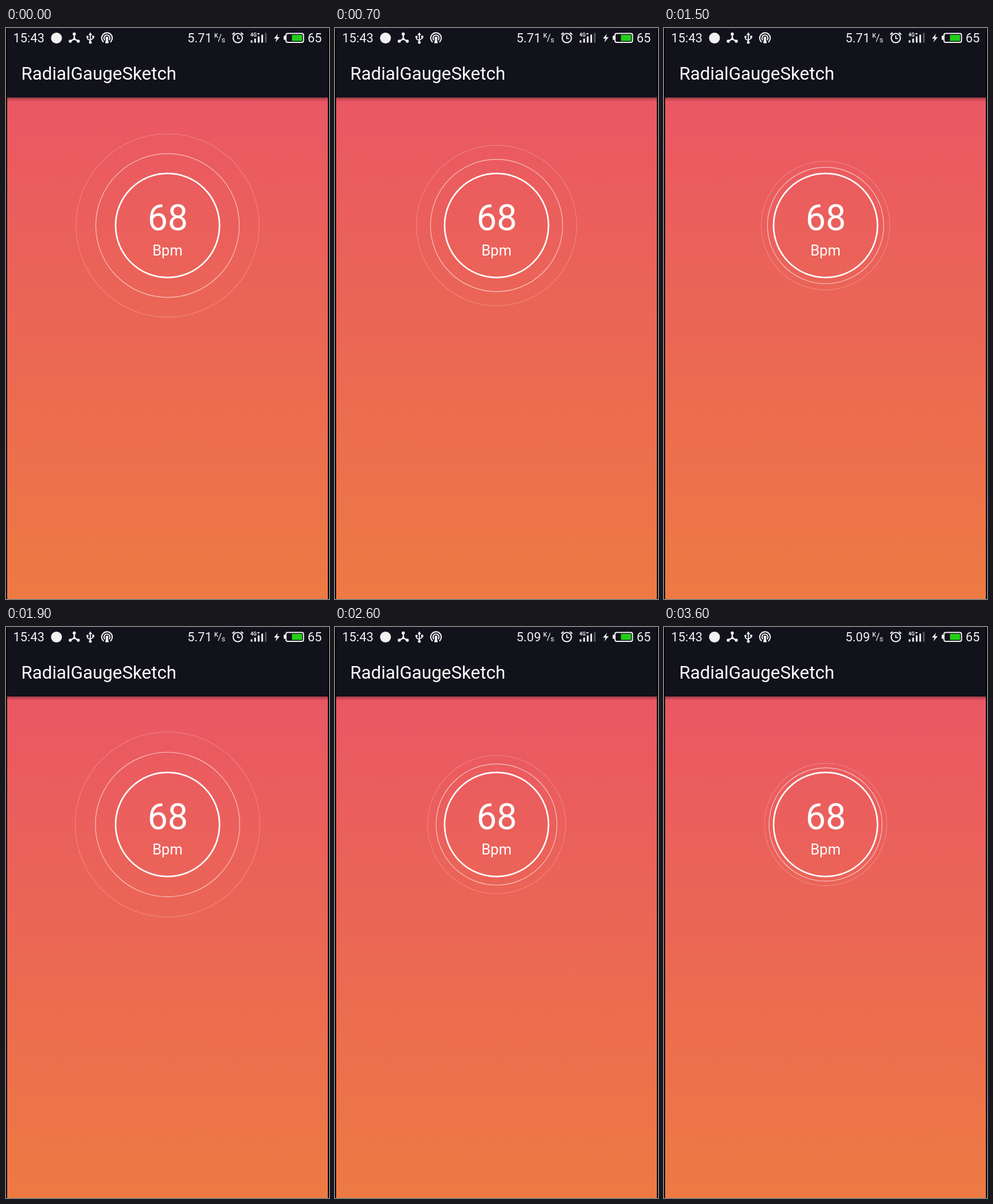
An HTML page with a canvas that plays this animation: 563x994 px, repeating every 3700 ms.

```html
<!DOCTYPE html>
<html lang="en">
<head>
<meta charset="utf-8">
<title>Pulse meter</title>
<style>
html, body { margin: 0; width: 100%; height: 100%; overflow: hidden; background: #000; }
canvas { display: block; }
</style>
</head>
<body>
<canvas id="stage" width="563" height="994"></canvas>
<script>
const ctx = document.getElementById('stage').getContext('2d');
const W = 563, H = 994, BAR = 121, LOOP = 3700, STEP = 100;
const CX = 281.6, CY = 343.8, R = 90.6, SPREAD = 41.9;
const BEATS = [-724, 145, 1162, 2194, 3312];
const BEAT_MS = 1000;
const DARK = '#11121a';
const TAU = Math.PI * 2;

function text(str, x, y, size, weight = 400, align = 'left') {
  ctx.font = `${weight} ${size}px Roboto, sans-serif`;
  ctx.textAlign = align;
  ctx.fillText(str, x, y);
}

function ring(x, y, r, width, alpha = 1, from = 0, to = TAU) {
  ctx.strokeStyle = `rgba(255,255,255,${alpha})`;
  ctx.lineWidth = width;
  ctx.beginPath();
  ctx.arc(x, y, r, from, to);
  ctx.stroke();
}

function dot(x, y, r) {
  ctx.beginPath();
  ctx.arc(x, y, r, 0, TAU);
  ctx.fill();
}

function line(width, ...pts) {
  ctx.strokeStyle = '#f2f2f2';
  ctx.lineWidth = width;
  ctx.beginPath();
  for (let i = 0; i < pts.length; i += 2) ctx.lineTo(pts[i], pts[i + 1]);
  ctx.stroke();
}

function shape(...pts) {
  ctx.beginPath();
  for (let i = 0; i < pts.length; i += 2) ctx.lineTo(pts[i], pts[i + 1]);
  ctx.fill();
}

function box(x, y, w, h, r) {
  ctx.beginPath();
  ctx.roundRect(x, y, w, h, r);
}

function background() {
  const g = ctx.createLinearGradient(0, BAR, 0, H);
  g.addColorStop(0, '#ea5764');
  g.addColorStop(0.45, '#eb6655');
  g.addColorStop(1, '#ee7a43');
  ctx.fillStyle = '#000';
  ctx.fillRect(0, 0, W, H);
  ctx.fillStyle = g;
  ctx.fillRect(2, BAR, 559, H - BAR);

  const s = ctx.createLinearGradient(0, BAR, 0, BAR + 7);
  s.addColorStop(0, 'rgba(0,0,0,.3)');
  s.addColorStop(1, 'rgba(0,0,0,0)');
  ctx.fillStyle = s;
  ctx.fillRect(2, BAR, 559, 7);
  ctx.fillStyle = DARK;
  ctx.fillRect(2, 0, 559, BAR);
}

function hubIcon(x, y) {
  for (const [dx, dy] of [[0, -6.5], [-7, 6], [7, 6]]) {
    line(2.4, x, y + 2, x + dx, y + dy);
    dot(x + dx, y + dy, 2.7);
  }
  dot(x, y + 2, 2.2);
}

function usbIcon(x, y) {
  line(1.8, x, y - 6, x, y + 8);
  shape(x - 3.2, y - 5, x, y - 10, x + 3.2, y - 5);
  line(1.6, x - 5, y - 2, x - 5, y + 1.5, x, y + 4.5);
  line(1.6, x + 5, y - 2, x + 5, y + 0.5, x, y + 3.5);
  dot(x - 5, y - 2, 2);
  ctx.fillRect(x + 3.2, y - 4, 3.6, 3.6);
  dot(x, y + 7.5, 2.5);
}

function hotspotIcon(x, y) {
  ring(x, y, 9.2, 2.1, 0.95, Math.PI * 0.72, Math.PI * 2.28);
  ring(x, y, 5.2, 2, 0.95, Math.PI * 0.75, Math.PI * 2.25);
  dot(x, y, 2.5);
  shape(x - 1, y, x + 1, y, x + 3.2, y + 9, x - 3.2, y + 9);
}

function alarmIcon(x, y) {
  ring(x, y, 8, 2.1, 0.95);
  line(1.8, x, y - 4.5, x, y + 0.8, x + 4, y + 0.8);
  line(2.2, x - 9.6, y - 6, x - 5.6, y - 9.3);
  line(2.2, x + 9.6, y - 6, x + 5.6, y - 9.3);
}

function signalIcon() {
  text('4G', 426, 14.5, 8.5, 700);
  shape(437.5, 9, 442.5, 9, 440, 12);
  [4, 7, 11, 14].forEach((h, i) => ctx.fillRect(426.5 + i * 6.2, 25.5 - h, 3, h));
  ctx.fillStyle = '#55565d';
  ctx.fillRect(451.3, 8.5, 3, 17);
  ctx.fillStyle = '#f2f2f2';
}

function batteryIcon() {
  shape(474, 10, 467, 18.5, 471.5, 18.5, 469.5, 25, 477, 16, 472.5, 16);
  ctx.fillRect(484, 13.5, 3, 7);
  box(488, 9.5, 30.5, 15.5, 3);
  ctx.strokeStyle = '#f2f2f2';
  ctx.lineWidth = 2;
  ctx.stroke();
  ctx.fillStyle = '#22cf18';
  ctx.fillRect(498.5, 12, 17.5, 10.5);
  ctx.fillStyle = '#f2f2f2';
}

function statusBar(t) {
  ctx.fillStyle = '#f2f2f2';
  text('15:43', 12.5, 25, 21.9);
  dot(88, 17.5, 9.5);
  hubIcon(119, 17);
  usbIcon(147, 17.5);
  hotspotIcon(176, 17.5);
  text(t < 2200 ? '5.71' : '5.09', 316.3, 25, 21.9);
  text('K', 363, 17, 10.5, 500);
  line(1.2, 370, 24, 375, 10.5);
  text('s', 375.5, 24.5, 13);
  alarmIcon(404, 17.5);
  signalIcon();
  batteryIcon();
  text('65', 525.8, 25, 21.9);
}

// Accelerate-decelerate growth, restarting with each beat
function gapAt(t) {
  const start = BEATS.filter(b => b <= t).pop();
  const x = Math.min(1, (t - start) / BEAT_MS);
  return SPREAD * (1 - Math.cos(Math.PI * x)) / 2;
}

function meter(t) {
  const gap = gapAt(t);
  ring(CX, CY, R + gap * 2, 1.1, 0.24);
  ring(CX, CY, R + gap, 1.2, 0.62);
  ring(CX, CY, R, 2.7);
  ctx.fillStyle = '#fff';
  text('68', 282, 352, 62.5, 400, 'center');
  text('Bpm', 281.5, 395.5, 25.5, 400, 'center');
}

function draw(t) {
  background();
  statusBar(t);
  ctx.fillStyle = '#fff';
  text('RadialGaugeSketch', 26.5, 90, 31.3);
  meter(t);
}

let origin = null;
function tick(now) {
  if (origin === null) origin = now;
  const t = (now - origin) % LOOP;
  draw(Math.floor(t / STEP) * STEP);
  requestAnimationFrame(tick);
}
draw(0);
requestAnimationFrame(tick);
</script>
</body>
</html>
```
